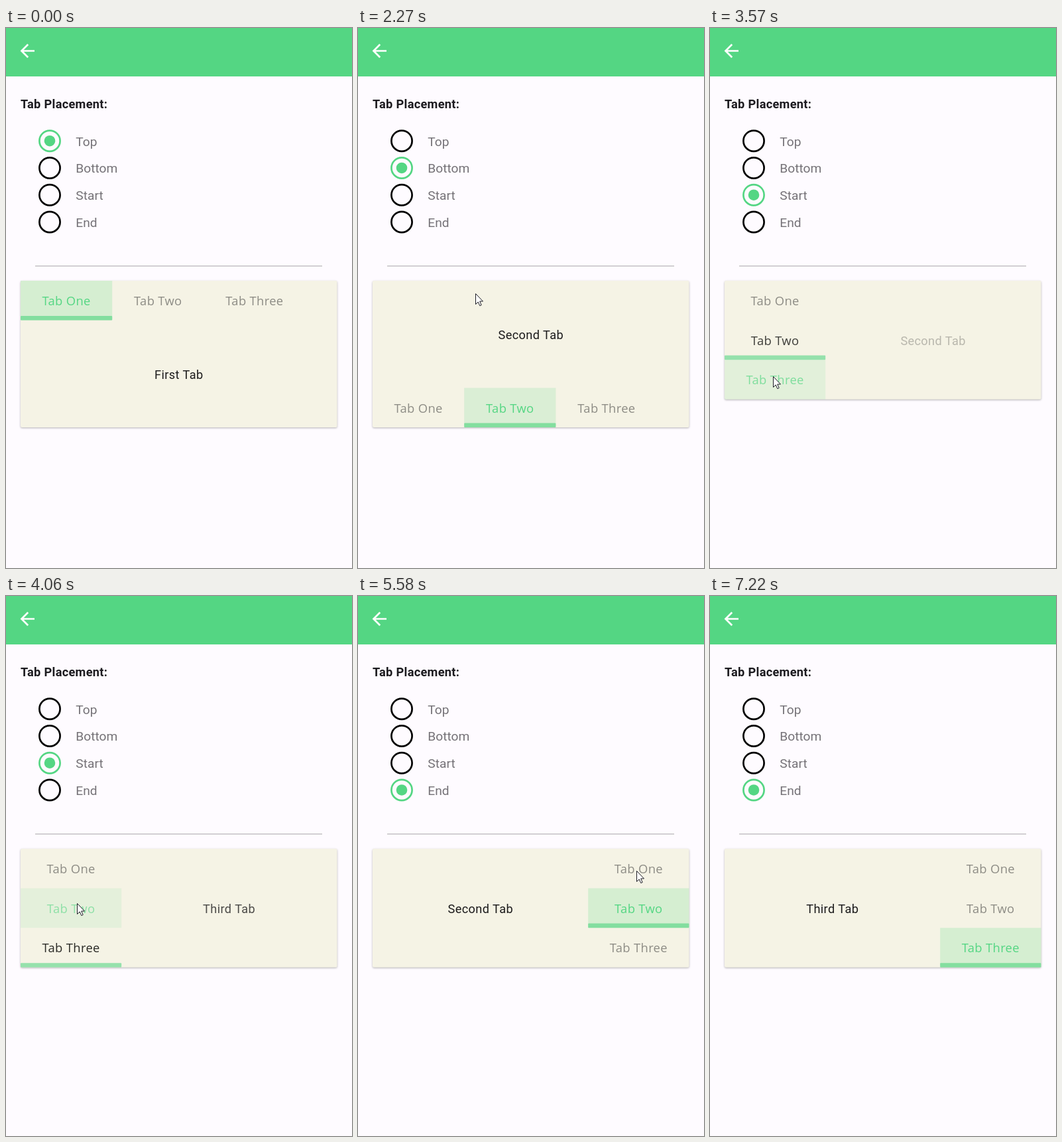
Recreate the animation shown at these times as an HTML page with a canvas. Size 522 px wide and 814 px high, loop 7.36 s.

```html
<!DOCTYPE html>
<html lang="en">
<head>
<meta charset="utf-8">
<title>Tab placement</title>
<style>
  html, body { margin: 0; width: 100%; height: 100%; overflow: hidden; background: #fefbff; }
  canvas { display: block; width: 522px; height: 814px; }
</style>
</head>
<body>
<canvas id="stage" width="522" height="814"></canvas>
<script>
const ctx = document.getElementById('stage').getContext('2d');
const LOOP = 7360, FIRST = 330, STEP = 68.9;
const GREEN = '84,214,131';
const ROBOTO = 'Roboto, sans-serif', OPEN_SANS = '"Open Sans", sans-serif';
const CARD = { left: 22, top: 381, width: 477.5 };
const ROW = 59.6;
const LABELS = ['Top', 'Bottom', 'Start', 'End'];
const TABS = ['Tab One', 'Tab Two', 'Tab Three'];
const PAGES = ['First Tab', 'Second Tab', 'Third Tab'];

// All times below are counted in steps after the first hold.
const placements = [[-1, 0], [12, 1], [33, 2], [66, 3]];
const selections = [[-99, 0], [23, 1], [46, 2], [54, 1], [79, 0], [85, 1], [90, 2]];
const pointerPath = [
  [0, 394, 753], [10, 133, 208], [13, 133, 208], [17, 212, 441], [19, 235, 591],
  [24, 235, 591], [31, 133, 256], [34, 133, 256], [39, 128, 348], [42, 95, 525],
  [47, 95, 525], [52, 107, 463], [56, 107, 463], [62, 130, 262], [65, 130, 285],
  [67, 130, 285], [75, 420, 424], [76, 420, 414], [79, 420, 414], [84, 427, 468],
  [86, 427, 523], [91, 427, 523], [96, 440, 815]
];
const arrowIcon = new Path2D('M20 11H7.83l5.59-5.59L12 4l-8 8 8 8 1.41-1.41L7.83 13H20v-2z');
const pointerIcon = new Path2D('M.5 .5V16.5L4.2 13L6.8 18.7L9.2 17.6L6.7 12H11.5Z');

const clamp = v => Math.max(0, Math.min(1, v));
const mix = (a, b, k) => a + (b - a) * k;
const lastIndex = (list, n) => list.findLastIndex(e => e[0] <= n);

function rect(x, y, w, h, color, radius = 0) {
  ctx.fillStyle = color;
  ctx.beginPath();
  ctx.roundRect(x, y, w, h, radius);
  ctx.fill();
}

function text(str, x, y, font, color, { align = 'left', spacing = 0, alpha = 1 } = {}) {
  ctx.font = font;
  ctx.letterSpacing = spacing + 'px';
  ctx.textAlign = align;
  ctx.fillStyle = color;
  ctx.globalAlpha = alpha;
  ctx.fillText(str, x, y);
  ctx.globalAlpha = 1;
}

function drawHeader() {
  rect(0, 0, 522, 814, '#fefbff');
  rect(0, 0, 522, 73, `rgb(${GREEN})`);
  ctx.save();
  ctx.translate(16.2, 18.4);
  ctx.scale(1.34, 1.34);
  ctx.fillStyle = '#fff';
  ctx.fill(arrowIcon);
  ctx.restore();
  text('Tab Placement:', 22, 120.5, `bold 18.2px ${ROBOTO}`, '#1c1b1f', { spacing: 0.3 });
  rect(44, 358, 433, 1.4, '#c4c1c4');
}

function drawRadios(chosen) {
  LABELS.forEach((label, i) => {
    const y = 170.2 + i * 40.75, on = i === chosen;
    ctx.lineWidth = 2.7;
    ctx.strokeStyle = on ? `rgb(${GREEN})` : '#000';
    ctx.beginPath();
    ctx.arc(66, y, 15.6, 0, 7);
    ctx.stroke();
    if (on) {
      ctx.fillStyle = `rgb(${GREEN})`;
      ctx.beginPath();
      ctx.arc(66, y, 8.3, 0, 7);
      ctx.fill();
    }
    text(label, 105.3, y + 7.5, `19.2px ${ROBOTO}`, '#757277');
  });
}

function tabBox(i, placement) {
  if (placement < 2) {
    return { x: 22 + 138.2 * i, y: placement ? 542.5 : CARD.top, w: i === 2 ? 153 : 138.2 };
  }
  return { x: placement === 2 ? 22 : 347.2, y: CARD.top + ROW * i, w: 152.2 };
}

function drawCard(placement, n) {
  const height = placement < 2 ? 221 : ROW * 3;
  ctx.save();
  ctx.shadowColor = 'rgba(0,0,0,.3)';
  ctx.shadowBlur = 3;
  ctx.shadowOffsetY = 1;
  rect(CARD.left, CARD.top, CARD.width, height, '#f5f3e5', 2);
  ctx.restore();

  const at = lastIndex(selections, n);
  const [start, current] = selections[at];
  const previous = at ? selections[at - 1][1] : current;
  const age = n - start;
  const next = selections[at + 1];
  const pressed = next && n >= next[0] - 2 ? next[1] : -1;

  TABS.forEach((label, i) => {
    const box = tabBox(i, placement);
    const selected = i === current;
    let color = '#8d8c85', alpha = 1;
    if (selected) {
      rect(box.x, box.y, box.w, ROW, `rgba(${GREEN},${0.2 * clamp(0.5 + age * 0.07)})`);
      color = `rgb(${GREEN})`;
      alpha = clamp(0.6 + age * 0.1);
    } else if (i === previous && age < 5) {
      const v = Math.round(mix(42, 140, age / 5));
      color = `rgb(${v},${v},${v - 4})`;
    }
    if (i === pressed) {
      rect(box.x, box.y + 3, box.w, ROW - 5.5, `rgba(${GREEN},.31)`);
    }
    text(label, box.x + box.w / 2, box.y + 37, `18.4px ${OPEN_SANS}`, color,
      { align: 'center', spacing: 0.33, alpha });
  });

  const bar = tabBox(age < 2 ? previous : current, placement);
  rect(bar.x, bar.y + ROW - 6.6, bar.w, 6.6, age < 2 ? '#95e1ac' : '#83de9f', 1);

  const x = [260.8, 260.8, 336.6, 184.8][placement];
  const y = [529, 469.3, 478, 478][placement];
  const page = age < 2 ? previous : current;
  const alpha = age < 2 ? 0.78 - age * 0.5 : clamp((age - 1) * 0.38);
  text(PAGES[page], x, y, `18.2px ${ROBOTO}`, '#1c1b1c',
    { align: 'center', spacing: 0.33, alpha });
}

function drawPointer(n) {
  const i = lastIndex(pointerPath, n);
  if (i < 0 || i === pointerPath.length - 1) return;
  const [t0, x0, y0] = pointerPath[i], [t1, x1, y1] = pointerPath[i + 1];
  const k = (n - t0) / (t1 - t0);
  ctx.save();
  ctx.translate(Math.round(mix(x0, x1, k)), Math.round(mix(y0, y1, k)));
  ctx.fillStyle = '#fff';
  ctx.strokeStyle = '#1b1b24';
  ctx.lineWidth = 1;
  ctx.fill(pointerIcon);
  ctx.stroke(pointerIcon);
  ctx.restore();
}

function draw(time) {
  const n = Math.max(-1, Math.floor((time % LOOP - FIRST + 8) / STEP));
  const placement = placements[lastIndex(placements, n)][1];
  drawHeader();
  drawRadios(placement);
  drawCard(placement, n);
  drawPointer(n);
}

const origin = performance.now();
function tick() {
  draw(performance.now() - origin);
  requestAnimationFrame(tick);
}
tick();
</script>
</body>
</html>
```
